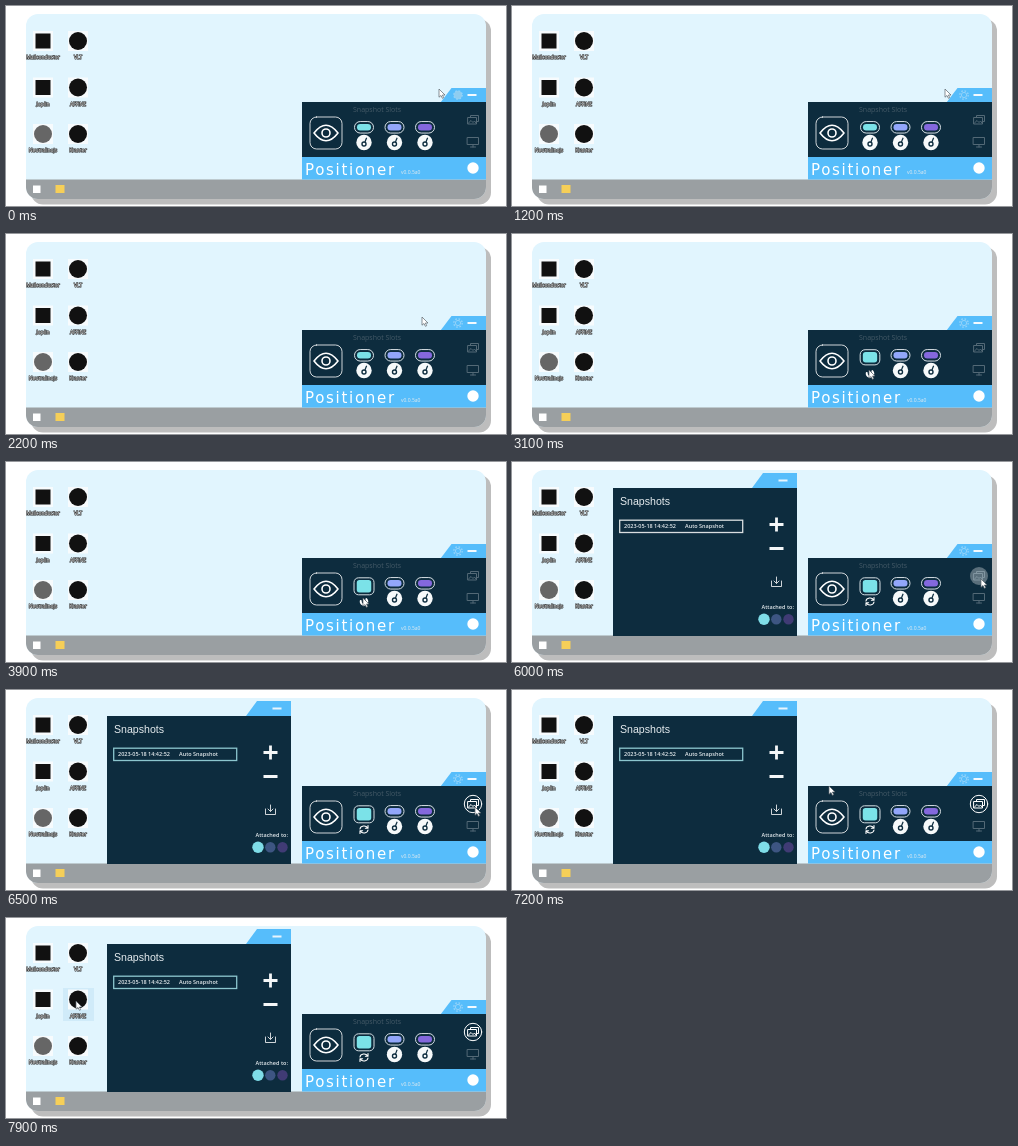
Recreate the animation shown at these times as an HTML page. Size 500 by 200 pixels, loop 8000 ms.

```html
<!DOCTYPE html>
<html lang="en">
<head>
<meta charset="utf-8">
<title>Desktop snapshots</title>
<style>
  html, body { margin: 0; width: 100%; height: 100%; overflow: hidden; background: #fff; }
  svg { display: block; width: 500px; height: 200px; }
  text { font-family: "Open Sans", "Noto Sans", sans-serif; fill: #e6ecef; }
  .label { font-size: 5px; text-anchor: middle; stroke: #222; stroke-width: 1px; paint-order: stroke; fill: #fff; }
  .title { font: 10.6px "Liberation Sans", Arial, sans-serif; }
  .brand { font: 15px "DejaVu Sans", sans-serif; letter-spacing: 1.7px; fill: #fff; }
  .small { font-size: 5.5px; font-weight: 600; }
  .line { fill: none; stroke: #fff; stroke-linecap: round; stroke-linejoin: round; }
</style>
</head>
<body>
<svg viewBox="0 0 500 200">
  <defs>
    <clipPath id="screen"><rect x="20" y="8" width="460" height="185" rx="12"/></clipPath>
    <g id="disc">
      <circle r="7.700" fill="#f6f9fa"/>
      <circle cy="1.500" r="2" fill="none" stroke="#0d2c3e" stroke-width="1.400"/>
      <path d="M1 -.5L2.600 -4.800" stroke="#0d2c3e" stroke-width="1.200"/>
    </g>
  </defs>

  <rect x="25" y="13" width="460" height="185.500" rx="12" fill="#bdbdbd"/>
  <g clip-path="url(#screen)">
    <rect x="20" y="8" width="461" height="186" fill="#e1f5fe"/>
    <rect id="selected" x="57" y="70" width="31" height="33" fill="#d0ebf9"/>
    <g id="icons"></g>
    <rect x="20" y="173.500" width="461" height="20" fill="#9a9fa2"/>
    <rect x="27" y="179.500" width="7.500" height="7.500" fill="#fff"/>
    <rect x="49.500" y="179" width="9" height="8" fill="#f6cf58"/>

    <g id="snapshots">
      <path d="M240 26L251 11H285V26Z" fill="#56bdfb"/>
      <path d="M266.500 18.500H275.500" stroke="#e8f5fd" stroke-width="2"/>
      <rect x="101" y="26" width="184" height="148" fill="#0d2c3e"/>
      <text class="title" x="108" y="43">Snapshots</text>
      <rect id="entry" x="107.700" y="58.200" width="123" height="12.300" fill="none" stroke-width="1.300"/>
      <text class="small" x="112" y="66.300">2023-05-18 14:42:52</text>
      <text class="small" x="173" y="66.300">Auto Snapshot</text>
      <path d="M257.500 62.500H271.500M264.500 55.500V69.500M257.500 86.500H271.500" stroke="#f4f7f8" stroke-width="2.800"/>
      <path class="line" d="M264.500 115V121M262 119L264.500 121.500L267 119M259.500 119V124.500H269.500V119" opacity=".8"/>
      <text class="small" x="249.500" y="147">Attached to:</text>
      <circle cx="252" cy="157.300" r="5.700" fill="#7fdde8"/>
      <circle cx="264.300" cy="157.300" r="5.200" fill="#3d5582"/>
      <circle cx="276.500" cy="157.300" r="5.200" fill="#403b75"/>
    </g>

    <path d="M434.500 96.500L445.500 82H481V96.500Z" fill="#56bdfb"/>
    <g id="gear" fill="none" stroke="#93d3fa">
      <circle cx="452" cy="89" r="2.600"/>
      <circle cx="452" cy="89" r="4.200" stroke-width="1.300" stroke-dasharray="1.650 1.650"/>
    </g>
    <path d="M461.500 89H470.500" stroke="#f4faff" stroke-width="2"/>
    <rect x="296" y="96" width="185" height="55" fill="#0d2c3e"/>
    <rect x="296" y="151" width="185" height="22.500" fill="#56bdfb"/>
    <text x="347" y="106.300" font-size="7" style="fill:#455a67">Snapshot Slots</text>
    <text class="brand" x="299" y="169">Positioner</text>
    <text x="395" y="168.300" font-size="5">v0.0.5a0</text>

    <g class="line">
      <rect x="304" y="111" width="32" height="32" rx="6.500" opacity=".8"/>
      <path d="M308 127Q320 111.500 332 127Q320 142.500 308 127Z" stroke-width="1.600"/>
      <circle cx="320" cy="127" r="4" stroke-width="1.600"/>
    </g>

    <g id="slots"></g>
    <use id="disc1" href="#disc" x="358" y="136.500"/>
    <circle id="loader" class="line" r="3.300" stroke-width="2" stroke-dasharray="13 8"/>
    <g id="refresh" class="line" transform="translate(358 139.500)">
      <path d="M-4 -.5A4 3.500 0 0 1 3.600 -1.500M4 .5A4 3.500 0 0 1 -3.600 1.500M4 -4V-1.300H1.400M-4 4V1.300H-1.400" stroke-width="1.100"/>
    </g>

    <circle id="hover" cx="467" cy="114" r="9" fill="#5a6f7b"/>
    <g id="photos" class="line">
      <circle id="ring" cx="467" cy="114" r="8.700"/>
      <path d="M464.500 111V109.500H472.500V115.500H471M462 111.500H470.500V118H462ZM462.500 117L465 114.500L467 116.500L468.500 115L470 117"/>
    </g>
    <path class="line" d="M461.500 131.500H472.500V138.500H461.500ZM467 138.500V141M464.500 141H469.500" style="stroke:#536976"/>
    <circle cx="467" cy="162" r="5.700" fill="#fff"/>

    <path id="cursor" d="M0 0V8.200L2 6.500L3.400 9.300L4.700 8.700L3.400 6H6Z" fill="#fff" stroke="#59636b" stroke-width=".7"/>
  </g>
</svg>
<script>
const LOOP = 8000;
const $ = id => document.getElementById(id);
const set = (el, attrs) => {
  for (const key in attrs) el.setAttribute(key, attrs[key]);
  return el;
};
const add = (parent, tag, attrs) =>
  parent.appendChild(set(document.createElementNS("http://www.w3.org/2000/svg", tag), attrs));
const show = (id, on) => { $(id).style.display = on ? "" : "none"; };
const clamp = v => Math.max(0, Math.min(1, v));

// Desktop shortcuts, two columns
[["Mailconductor", 1], ["VLT", 0], ["Joplin", 1], ["AFFiNE", 0], ["Neutralinojs", 0], ["Kranter", 0]]
  .forEach(([name, square], i) => {
    const x = 37 + 35 * (i % 2), y = 35 + 46.5 * (i >> 1), g = $("icons");
    add(g, "rect", { x: x - 10, y: y - 10, width: 20, height: 20, fill: "#f7fbfd" });
    if (square) add(g, "rect", { x: x - 7.5, y: y - 7.5, width: 15, height: 15, fill: "#111" });
    else add(g, "circle", { cx: x, cy: y, r: 9, fill: i === 4 ? "#666" : "#111" });
    add(g, "text", { x, y: y + 18, class: "label" }).textContent = name;
  });

// Each slot is an outline with a coloured core
const slots = ["#7be2e8", "#92a6fa", "#8468dd"].map((fill, i) => {
  const x = 358 + 30.5 * i;
  if (i) add($("slots"), "use", { href: "#disc", x, y: 136.5 });
  return {
    x,
    rim: add($("slots"), "rect", { fill: "none", stroke: "#d5dee3" }),
    core: add($("slots"), "rect", { fill })
  };
});
function drawSlot({ x, rim, core }, open) {
  const box = (el, w, h, rx) =>
    set(el, { x: x - w / 2, y: 121.3 + 3 * open - h / 2, width: w, height: h, rx });
  box(rim, 19 + open, 11.5 + 5.5 * open, 5.7 - 1.2 * open);
  box(core, 14 + 0.5 * open, 6.5 + 6 * open, 3.2 - 0.4 * open);
}
slots.forEach(s => drawSlot(s, 0));

// Cursor path: time, x, y
const path = [
  [0, 433, 83], [1800, 433, 83], [2200, 416, 83], [2600, 357, 136],
  [4200, 357, 136], [4700, 469, 117], [6800, 469, 117],
  [7100, 400, 104], [7200, 317, 96], [7500, 150, 88], [7900, 70, 83], [8000, 70, 83]
];
function cursorAt(t) {
  const i = path.findIndex(p => p[0] > t);
  const [t0, x0, y0] = path[i - 1], [t1, x1, y1] = path[i];
  const k = (t - t0) / (t1 - t0);
  return [x0 + (x1 - x0) * k, y0 + (y1 - y0) * k];
}

function draw(now) {
  const t = Math.floor((now % LOOP) / 100) * 100;
  const active = t >= 6100;
  drawSlot(slots[0], clamp((t - 2900) / 300));
  show("disc1", t < 3000);
  show("loader", t >= 3000 && t < 4200);
  show("refresh", t >= 4200);
  set($("loader"), { transform: `translate(358 139.5) rotate(${t * 0.45})` });
  set($("gear"), { fill: t < 200 ? "#8fcdf0" : "none" });
  show("hover", t >= 4700 && !active);
  show("ring", active);
  $("photos").style.stroke = active ? "#fff" : t >= 4700 ? "#8296a1" : "#536976";
  show("snapshots", t >= 6000);
  set($("entry"), { stroke: active ? "#8cc6ce" : "#d9dee0" });
  show("selected", t >= 7800);
  set($("cursor"), { transform: `translate(${cursorAt(t)})` });
}

const start = performance.now();
function tick() {
  draw(performance.now() - start);
  requestAnimationFrame(tick);
}
tick();
</script>
</body>
</html>
```
